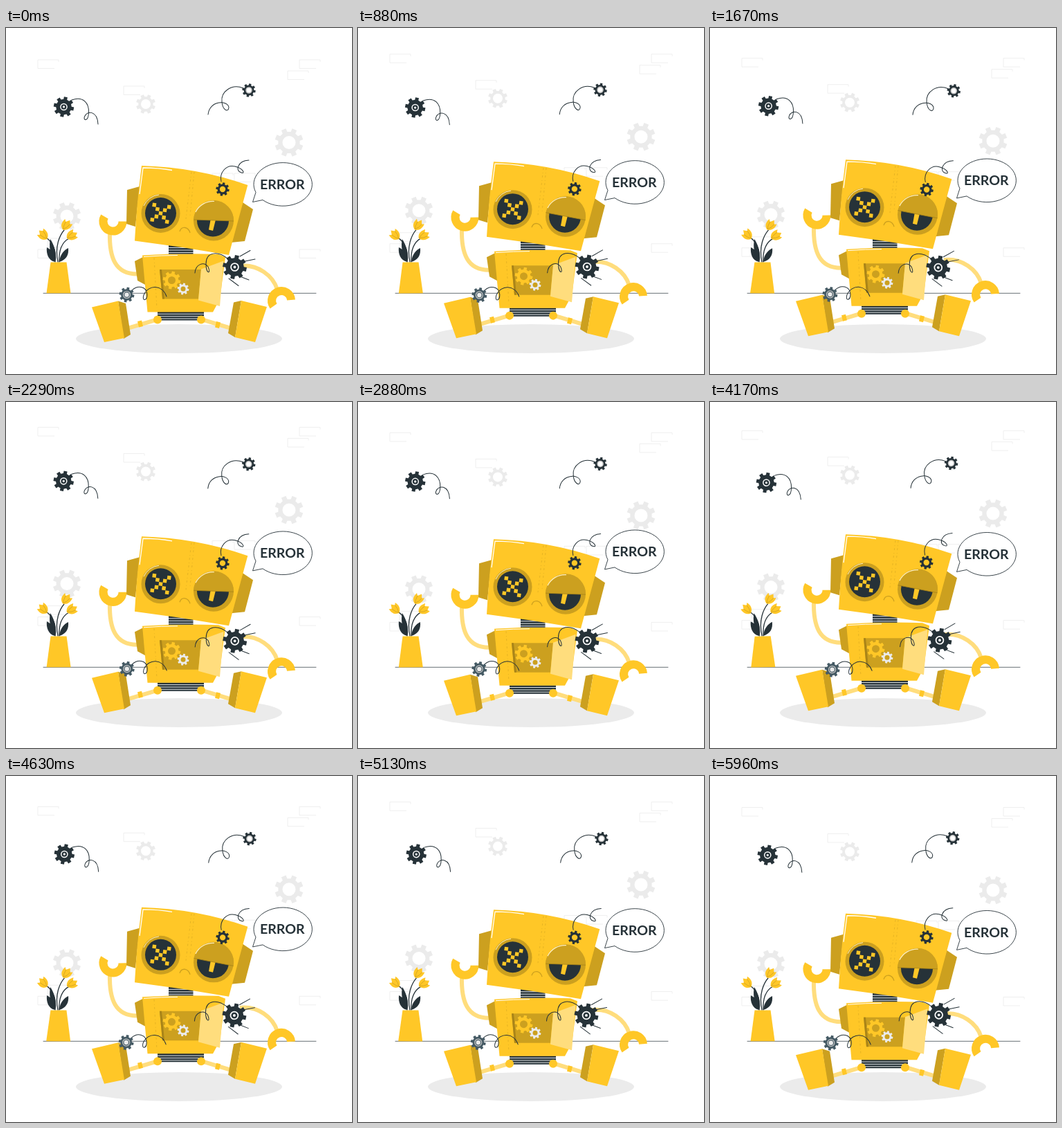
An HTML page that plays this animation: 500x500 px, repeating every 6000 ms.

```html
<!DOCTYPE html>
<html lang="en">
<head>
<meta charset="utf-8">
<title>Broken robot</title>
<style>
  html, body { margin: 0; width: 100%; height: 100%; overflow: hidden; background: #fff; }
  svg { display: block; width: 100vw; height: 100vh; }
  .y { fill: #ffc727; }
  .s { fill: #cca01f; }
  .l { fill: #ffdd7d; }
  .d { fill: #263238; }
  .m { fill: #455a64; }
  .g { fill: #ebebeb; }
  .line { fill: none; stroke: #263238; stroke-linecap: round; }
  .limb { fill: none; stroke: #ffdd7d; stroke-width: 6; }
  .hand { fill: none; stroke: #ffc727; stroke-width: 12; }
  .brick { fill: none; stroke: #ebebeb; stroke-width: 0.8; }
  .seam { fill: none; stroke: #dfae22; stroke-width: 0.8; stroke-dasharray: 3 4 1 3; }
  text { font: 700 19.6px Lato, "Open Sans", sans-serif; text-anchor: middle; fill: #263238; }
</style>
</head>
<body>
<svg viewBox="0 0 500 500">
  <g id="backdrop"></g>
  <path class="line" d="M54 383.3H448" stroke-width=".7"/>
  <ellipse class="g" cx="250" cy="449" rx="149" ry="21"/>

  <g id="plant">
    <path class="line" d="M71 338C74 318 64 307 58 303M75 338C70 315 78 299 84 292M77 338C76 320 82 309 91 304" stroke-width="1.3"/>
    <path class="d" d="M71 338C61 336 58 326 59 317C67 321 71 328 71 338ZM77 338C78 327 84 321 90 318C91 328 87 335 77 338ZM71 337C63 327 62 314 64 305C70 314 73 326 71 337Z"/>
    <g id="tulips"></g>
    <path class="y" d="M64.500 338.500H87.500L93.500 383.300H58.500Z"/>
  </g>

  <g id="robot">
    <path class="limb" d="M220 421L176 434M282 421L325 434"/>
    <path class="y" d="M190 424L196 422.500L198 431L192 432.500ZM304 424L310 425.500L308 434L302 432.500Z"/>
    <path class="s" d="M162 394.500L173 398L180 443L170 449ZM340 394L329 396.500L321 441L331 447Z"/>
    <path class="y" d="M124 403.500L162 394.500L171 448L142 454ZM340 394L377 403L360 454L331 447Z"/>
    <path class="d" d="M219 410H286V422.500H219Z"/>
    <path d="M219 413.300H286M219 416.700H286M219 420H286" stroke="#dfe3e5"/>
    <circle class="y" cx="219" cy="421.500" r="6"/>
    <circle class="y" cx="282" cy="421.500" r="6"/>

    <path class="limb" d="M150 295C149 332 158 356 190 355.500"/>
    <path class="limb" d="M338 344C364 341 386 358 392 378"/>
    <path class="hand" d="M142.400 272.500A14 14 0 1 0 168.500 279.500"/>
    <path class="hand" d="M386.500 402A14 14 0 1 1 412 393"/>

    <path class="s" d="M186 337L198 331L203 372L190 365Z"/>
    <path class="y" d="M197 328.500Q252 325 307 327L317 331L309 392L299 410.500H204.500Z"/>
    <path d="M199 330.500Q225 328.500 248 328.500" stroke="#fff" fill="none"/>
    <path class="seam" d="M214 332L218 405"/>
    <path class="s" d="M222 349H282L278 391.500H226Z"/>
    <path d="M222 349H225L229 391.500H226Z" fill="#a98418"/>
    <g id="innerGears"></g>
    <path class="l" d="M282 348.500L314.500 336.500L309 402L278 393.500Z"/>

    <path class="d" d="M235 312H270.500V326.500H235Z"/>
    <path d="M235 317.500H271M235 321H271M235 324.500H271" stroke="#dfe3e5"/>

    <path class="s" d="M175 234L193 229L187 287L174 283ZM342 252L357 262L345 308L325 310Z"/>
    <path class="y" d="M196 199Q275 201 349.300 227L322 328Q254 316 186 307.500Q189 252 196 199Z"/>
    <path d="M193 240L198 202Q220 202 240 205.500" stroke="#fff" stroke-width="1.300" fill="none"/>
    <path class="seam" d="M268 208L260 276M272 208L266 272"/>
    <path d="M251 294Q253 287.500 259 288.500Q264 289.500 266 296" stroke="#cca01f" stroke-width="1.300" fill="none"/>

    <circle class="s" cx="223.500" cy="268" r="28"/>
    <circle class="d" cx="223.500" cy="267.500" r="22.500"/>
    <path d="M199 257A27 27 0 0 1 221 241" stroke="#fff0c0" fill="none"/>
    <g id="cross" class="y" transform="translate(223.500 267.800) rotate(8)"></g>

    <circle class="s" cx="300" cy="278.500" r="29"/>
    <circle class="d" cx="299" cy="278.500" r="23"/>
    <path class="y" d="M296 275L303 277L299 293L293 291.500Z"/>
    <g id="lid">
      <path d="M271 277A29 29 0 0 1 329 279Z" class="s"/>
      <path d="M271 277L329 279" stroke="#a98418" stroke-width=".8"/>
    </g>
    <path d="M274 266A28 28 0 0 1 301 250.500" stroke="#fff0c0" stroke-width="1.200" fill="none"/>
  </g>

  <g id="parts">
    <path class="line" d="M95 104C112 98 120 109 119.500 122C119 136 111 134 113.500 128C117 119 132 119 133 139"/>
    <path class="line" d="M343 87C326 80 310 92 312 107C313 118 321 123 322 115C321 104 294 104 292 125"/>
    <path class="line" d="M182 379C190 371 203 373 204 385C204 395 196 395 199 386C206 370 226 371 232 388"/>
    <path class="line" d="M320 333C306 322 289 323 289 341C289 356 297 356 292 345C286 337 274 341 273 354"/>
    <path class="line" d="M311 222C308 209 318 197 331 200C343 203 346 211 340 209C331 207 334 192 351 191"/>
    <path class="line" d="M338 330L353 321.500M343 337.500L360 334M322 362L336 372.500M338 359L351 364"/>
  </g>

  <g id="bubble">
    <path d="M371 248.500L356.500 251.500L361 237.500A42.200 31.300 0 1 1 371 248.500Z" fill="#fff" stroke="#263238" stroke-width=".9"/>
    <text x="399.300" y="233">ERROR</text>
  </g>
</svg>
<script>
const $ = id => document.getElementById(id);
const add = (id, markup) => $(id).insertAdjacentHTML("beforeend", markup);

function gearPath(x, y, r, hole = 0, turn = 0.2, teeth = 8) {
  const pt = (radius, a) =>
    `${(x + radius * Math.cos(a)).toFixed(2)} ${(y + radius * Math.sin(a)).toFixed(2)}`;
  const step = 2 * Math.PI / teeth, root = r * 0.76, pts = [];
  for (let i = 0; i < teeth; i++) {
    const a = turn + i * step;
    pts.push(pt(root, a - step * 0.29), pt(r, a - step * 0.22),
             pt(r, a + step * 0.22), pt(root, a + step * 0.29));
  }
  const cut = hole
    ? `M${x - hole} ${y}a${hole} ${hole} 0 1 0 ${2 * hole} 0a${hole} ${hole} 0 1 0 ${-2 * hole} 0Z` : "";
  return `M${pts.join("L")}Z${cut}`;
}
const gear = (cls, ...shape) =>
  `<path class="${cls}" fill-rule="evenodd" d="${gearPath(...shape)}"/>`;
const dot = (x, y, r, fill) => `<circle cx="${x}" cy="${y}" r="${r}" fill="${fill}"/>`;
const target = (x, y, r) =>
  gear("d", x, y, r) + dot(x, y, r * 0.36, "#fff") + dot(x, y, r * 0.26, "#263238") + dot(x, y, r * 0.11, "#fff");

const bricks = [[46, 46], [424, 46], [407, 62], [170, 84], [46, 320],
                [424, 320], [298, 210], [330, 210], [60, 304]];
for (const [x, y] of bricks)
  add("backdrop", `<path class="brick" d="M${x + 30} ${y + 3}V${y}H${x}V${y + 12.5}H${x + 24}"/>`);
for (const [x, y, r, hole] of [[202, 110, 14.2, 7], [409, 165.5, 20.8, 9.5], [88, 272, 20.5, 9.5]])
  add("backdrop", gear("g", x, y, r, hole, Math.PI / 8));

for (const [x, y, turn] of [[54, 299, -50], [87, 285, 30], [95, 300, 55]])
  add("tulips", `<g transform="translate(${x} ${y}) rotate(${turn})">
    <path class="y" d="M-1 8C-9 4 -7 -3 -6 -7L-3 -4L1 -9L4 -4L7 -6C8 0 6 6 -1 8Z"/>
    <path d="M-3 -4Q-3 3 -1 7Q3 3 4 -4" fill="none" stroke="#cca01f" stroke-width=".7"/></g>`);

add("innerGears", gear("y", 239.5, 364.5, 13, 5.5) + gear("g", 256, 377, 8.5, 3.5));

for (let i = -2; i <= 2; i++)
  for (const j of new Set([i, -i]))
    add("cross", `<rect x="${i * 5.4 - 2.7}" y="${j * 5.4 - 2.7}" width="5.4" height="5.4"/>`);

add("parts",
  target(83.5, 114, 14.8) + target(330.5, 345.5, 17.5) +
  gear("d", 351, 90, 9.8) + dot(351, 90, 4.8, "#c7c7c7") + dot(351, 90, 3.2, "#fff") +
  gear("m", 174.5, 385.5, 11) + dot(174.5, 385.5, 5.6, "#c7c7c7") + dot(174.5, 385.5, 4.4, "#455a64") +
  dot(174.5, 385.5, 3.2, "#ebebeb") +
  gear("d", 313, 233, 9.8) + dot(313, 233, 4.2, "#ffc727"));

const LOOP = 6000;
const clamp = v => Math.min(1, Math.max(0, v));
// Rises by 10 px and returns, at constant speed.
const rise = (t, period) => -10 * (1 - Math.abs(1 - 2 * (t % period) / period));
// Swings 0 -> 1 -> -1 -> 0 degrees.
function sway(t, period) {
  const p = (t % period) / period;
  return p < 0.25 ? 4 * p : p < 0.75 ? 2 - 4 * p : 4 * p - 4;
}
const lift = (id, y) => $(id).setAttribute("transform", `translate(0 ${y.toFixed(3)})`);
const spin = (id, deg, x, y) => $(id).setAttribute("transform", `rotate(${deg.toFixed(3)} ${x} ${y})`);

function draw(t) {
  lift("backdrop", rise(t, 1500));
  lift("robot", rise(t, 3000));
  lift("bubble", rise(t, 6000));
  const angle = sway(t, 1500);
  spin("parts", angle, 250, 250);
  spin("plant", angle, 74, 329);
  const p = t % 3000;
  spin("lid", 9 * Math.min(clamp(p / 900), clamp((2100 - p) / 400)), 300, 278);
}

const start = performance.now();
function tick() {
  draw((performance.now() - start) % LOOP);
  requestAnimationFrame(tick);
}
tick();
</script>
</body>
</html>
```
